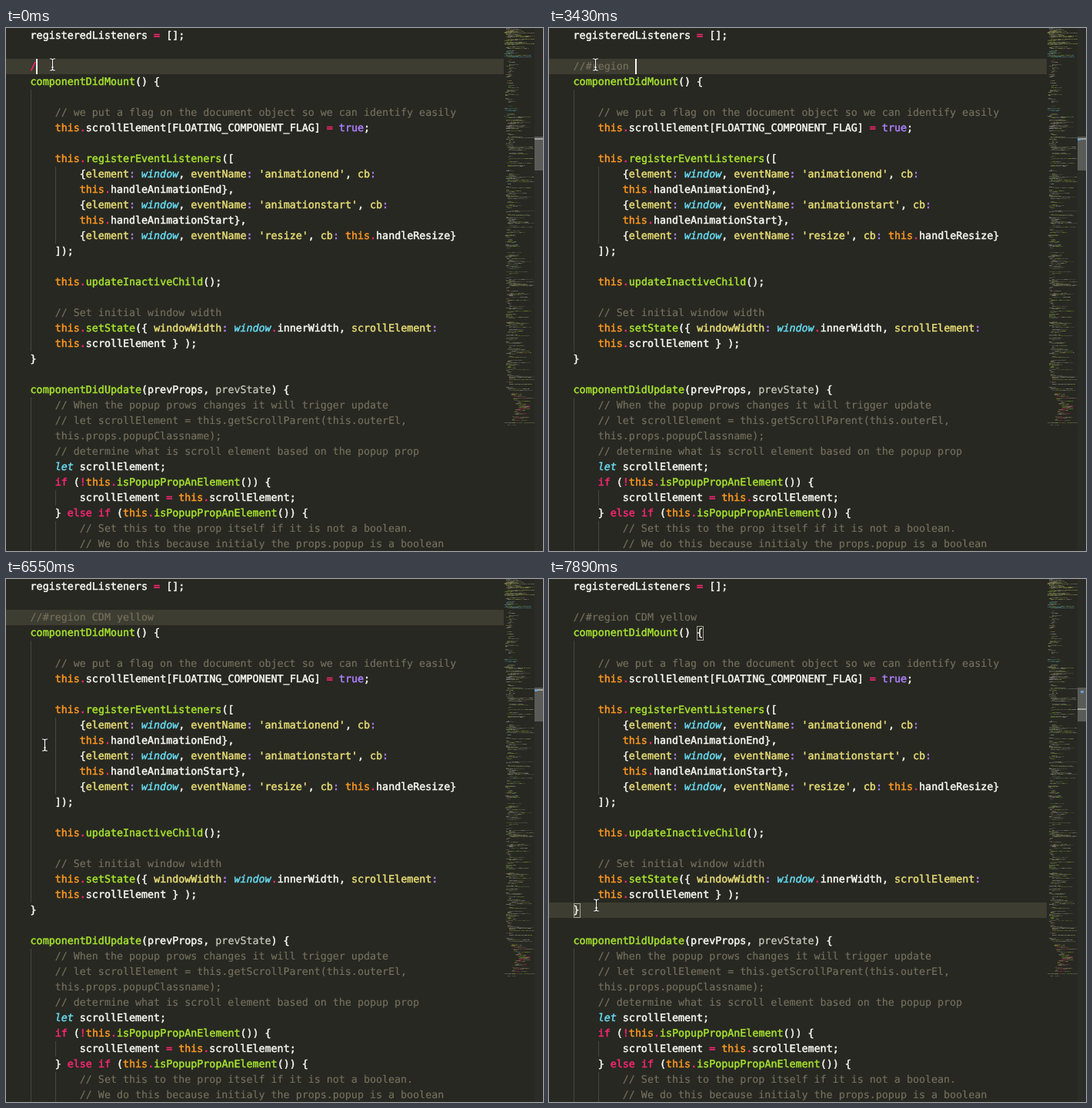
These frames come from a looping animation (698x679 px, 8 s). An HTML page with a canvas:

```html
<!DOCTYPE html>
<html lang="en">
<head>
<meta charset="utf-8">
<title>Code editor</title>
<style>
html, body { margin: 0; width: 100%; height: 100%; overflow: hidden; background: #272822; }
body { position: relative; }
body > *, .guide, .match { position: absolute; left: 0; top: 0; }
#code {
  left: 31.6px; top: 1px; margin: 0; color: #f8f8f2;
  font: 13.33px/20px "DejaVu Sans Mono", monospace;
  text-rendering: geometricPrecision; -webkit-text-stroke: .5px;
}
.comment { color: #75715e; -webkit-text-stroke: .15px; }
.string, .key { color: #e6db74; }
.self { color: #fd971f; }
.type { color: #66d9ef; font-style: italic; }
.op { color: #f92672; }
.num { color: #ae81ff; }
.call { color: #a6e22e; }
.dim { color: #cfcfc2; -webkit-text-stroke: .2px; }
.guide { width: 1px; background: #45463d; }
.match { width: 7px; height: 17px; border: 1px solid #a4a498; }
#band { width: 647px; height: 20px; background: #3e3d32; }
#caret { width: 2px; height: 20px; background: #f8f8f0; }
#map { left: 647px; }
#mapLine { left: 648px; top: 114px; height: 1px; background: #75715e; }
#track { left: 687px; width: 11px; height: 679px; background: #2b2c27; }
#thumb { left: 687px; top: 141px; width: 11px; height: 44px; background: #5a5b57; }
#tick { left: 687px; width: 11px; height: 2px; background: #a3a49f; }
#mark { height: 3px; width: 4px; background: #6f9cc4; }
#pointer { overflow: visible; fill: none; }
</style>
</head>
<body>
<div id="band"></div>
<div id="guides"></div>
<pre id="code"></pre>
<div id="matches">
  <div class="match" style="left:192px;top:61px"></div>
  <div class="match" style="left:32px;top:421px"></div>
</div>
<div id="caret"></div>
<canvas id="map" width="40" height="520"></canvas>
<div id="mapLine"></div>
<div id="track"></div>
<div id="thumb"></div>
<div id="tick"></div>
<div id="mark"></div>
<svg id="pointer" width="1" height="1">
  <defs><path id="beam" d="M-3.5-7.5h1.5q2 0 2 2V5.5q0 2-2 2h-1.5M3.5-7.5h-1.5q-2 0-2 2V5.5q0 2 2 2h1.5M-1.5 3.5h3"/></defs>
  <use href="#beam" stroke="#1b1c18" stroke-width="3"/>
  <use href="#beam" stroke="#fff" stroke-width="1.2"/>
</svg>
<script>
const $ = id => document.getElementById(id);
const LOOP = 8000, LEFT = 31.6, CHAR = 8.026;

// A leading ~ marks a soft-wrapped comment line, @ the line being typed.
const source = `registeredListeners = [];

@
componentDidMount() {

    // we put a flag on the document object so we can identify easily
    this.scrollElement[FLOATING_COMPONENT_FLAG] = true;

    this.registerEventListeners([
        {element: window, eventName: 'animationend', cb:
        this.handleAnimationEnd},
        {element: window, eventName: 'animationstart', cb:
        this.handleAnimationStart},
        {element: window, eventName: 'resize', cb: this.handleResize}
    ]);

    this.updateInactiveChild();

    // Set initial window width
    this.setState({ windowWidth: window.innerWidth, scrollElement:
    this.scrollElement } );
}

componentDidUpdate(prevProps, prevState) {
    // When the popup prows changes it will trigger update
    // let scrollElement = this.getScrollParent(this.outerEl,
~    this.props.popupClassname);
    // determine what is scroll element based on the popup prop
    let scrollElement;
    if (!this.isPopupPropAnElement()) {
        scrollElement = this.scrollElement;
    } else if (this.isPopupPropAnElement()) {
        // Set this to the prop itself if it is not a boolean.
        // We do this because initialy the props.popup is a boolean`;

const tokens = /(?<string>'.*?')|(?<self>\bthis\b)|(?<type>\b(?:window|let)\b)|(?<op>\b(?:if|else)\b|[.=!])|(?<num>\btrue\b|:)|(?<call>\w+(?=\())|(?<key>\w+(?=:))|(?<dim>prevState)/g;
const span = (cls, text) => `<span class="${cls}">${text}</span>`;

function highlight(line) {
  if (line === '@') return '<span id="typed"></span>';
  if (/^(~|\s*\/\/)/.test(line)) return span('comment', line.replace('~', ''));
  return line.replace(tokens, (text, ...rest) => {
    const groups = rest.at(-1);
    return span(Object.keys(groups).find(name => groups[name]), text);
  });
}
$('code').innerHTML = source.split('\n').map(highlight).join('\n');

// [x, top, bottom]
const guides = [[32, 80, 420], [64, 180, 280], [32, 480, 679], [64, 600, 620], [64, 640, 679]];
$('guides').innerHTML = guides.map(([x, top, bottom]) =>
  `<div class="guide" style="left:${x}px;top:${top}px;height:${bottom - top}px"></div>`).join('');

function drawMinimap() {
  const ctx = $('map').getContext('2d');
  let seed = 11;
  const random = () => (seed = seed * 16807 % 2147483647) / 2147483647;
  const code = ['#d8d8d0', '#d8d8d0', '#b9b9b0', '#e6db74', '#a6e22e', '#75715e'];
  const imports = ['#e6db74', '#e6db74', '#a6e22e', '#d8d8d0'];
  const consts = ['#66d9ef', '#66d9ef', '#a6e22e', '#d8d8d0'];
  const markup = ['#f92672', '#a6e22e', '#e6db74', '#d8d8d0'];
  const gray = ['#d8d8d0', '#8b897b'];
  // Each section: top, bottom, indent, longest line, share of blank rows, palette
  const sections = [
    [0, 3, 1, 30, 0, gray], [3, 13, 1, 38, .25, imports], [14, 27, 1, 38, .35, imports],
    [29, 39, 1, 38, .3, consts], [41, 70, 3, 10, .4, code], [70, 102, 2, 16, .45, code],
    [103, 108, 1, 32, .3, consts], [111, 114, 2, 14, .3, code], [115, 134, 3, 32, .35, code],
    [135, 260, 3, 36, .35, code], [261, 300, 2, 26, .4, code], [301, 342, 3, 32, .35, code],
    [344, 424, 3, 28, .4, code], [426, 472, 3, 35, .35, code], [474, 494, 9, 30, .15, markup],
    [494, 510, 12, 18, .15, markup], [512, 517, 1, 38, .4, code]
  ];
  for (const [top, bottom, indent, longest, blank, palette] of sections) {
    for (let y = top; y < bottom; y++) {
      if (random() < blank) continue;
      let x = indent + Math.floor(random() * 3) * 2;
      if (palette === markup) x += y < 494 ? (y - 474) / 2 : (502 - y) / 2;
      const end = Math.min(40, x + 3 + longest * random() ** 1.6);
      while (x < end) {
        const width = 1 + random() * 5;
        ctx.globalAlpha = .15 + random() * .27;
        ctx.fillStyle = palette[Math.floor(random() * palette.length)];
        ctx.fillRect(x, y, Math.min(width, end - x), 1);
        x += width + .6;
      }
    }
  }
}
drawMinimap();

const phrase = '//#region CDM yellow';
// [time, characters typed]
const typing = [[0, 1], [150, 2], [1050, 3], [2090, 4], [2240, 5], [2390, 6], [2690, 8], [3130, 9],
  [3430, 10], [3880, 11], [4020, 12], [4320, 13], [4620, 14], [4910, 15], [5060, 16], [5210, 17],
  [5360, 18], [5660, 20]];
const caretOff = [[600, 1050], [1500, 2090], [6260, 6700], [7140, 7440], [7890, LOOP]];
// [time, x, y]
const moves = [[0, 60.5, 47.5], [6410, 58.5, 90.5], [6550, 50.5, 215.5], [6700, 45.5, 350.5],
  [6850, 48.5, 430.5], [6990, 55.5, 443.5], [7140, 61.5, 423.5]];
const latest = (list, t) => list.findLast(item => item[0] <= t);

function place(el, styles) {
  for (const name in styles) el.style[name] = styles[name] + 'px';
}

function render(t) {
  const count = latest(typing, t)[1];
  const clicked = t >= 7440;
  const lineTop = clicked ? 420 : 40;
  const typed = $('typed');
  typed.textContent = phrase.slice(0, count);
  typed.className = count > 1 ? 'comment' : 'op';

  place($('band'), { top: lineTop });
  place($('caret'), { left: Math.round(LEFT + CHAR * (clicked ? 1 : count) - .3), top: lineTop });
  $('caret').hidden = caretOff.some(([from, to]) => t >= from && t < to);
  $('matches').hidden = !clicked;

  place($('mapLine'), { width: count * .53 });
  place($('tick'), { top: clicked ? 168 : 143 });
  place($('mark'), { left: clicked ? 691 : 687, top: clicked ? 145 : 143 });
  $('mark').hidden = t < 150;

  const [, x, y] = latest(moves, t);
  $('pointer').style.transform = `translate(${x}px, ${y}px)`;
}

function animate(now) {
  render(now % LOOP);
  requestAnimationFrame(animate);
}
render(0);
requestAnimationFrame(animate);
</script>
</body>
</html>
```
